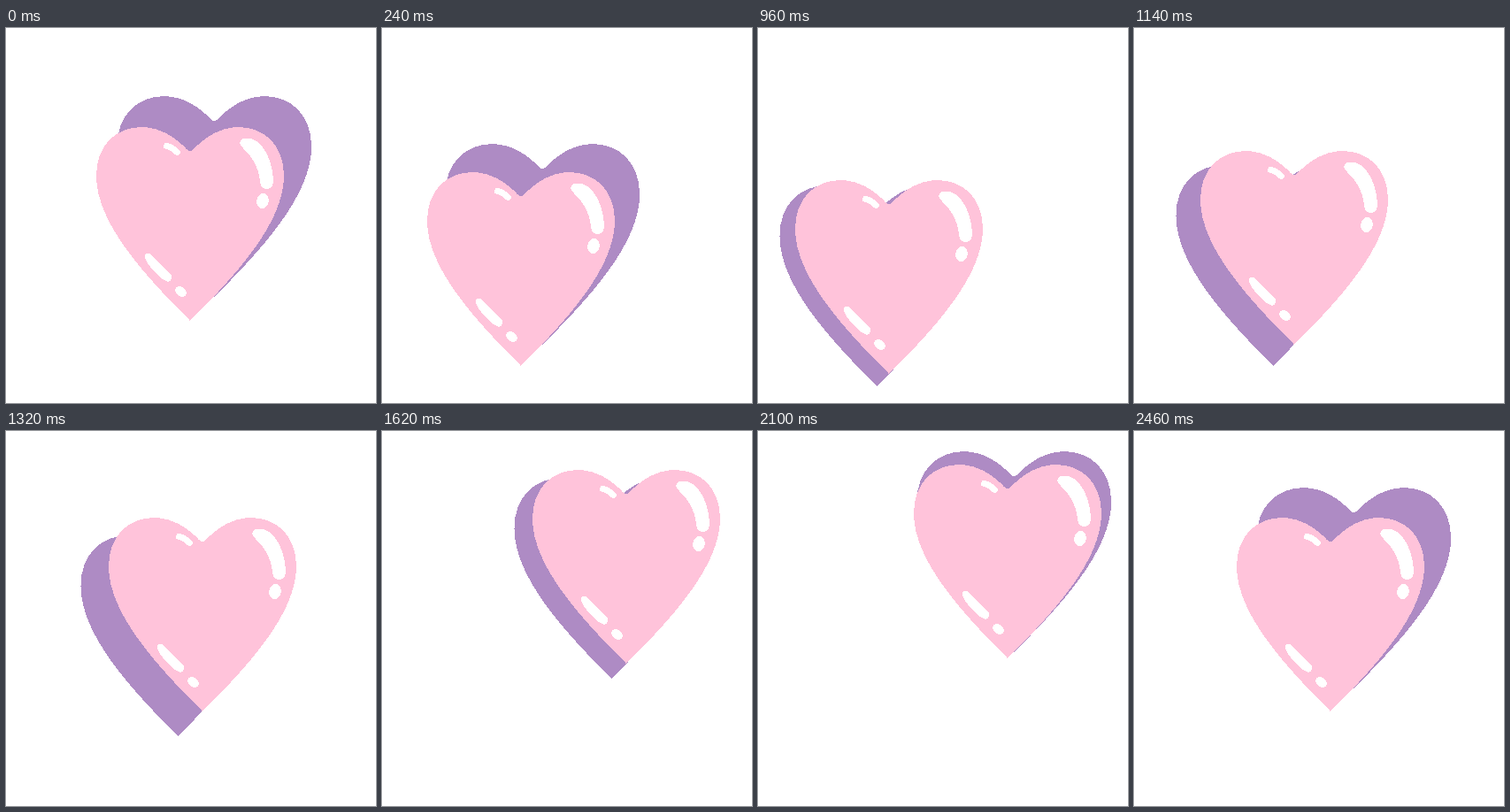
An HTML page for the animation above (2.52 s loop, 418 px wide and 424 px high).

```html
<!DOCTYPE html>
<html lang="en">
<head>
<meta charset="utf-8">
<title>Floating heart</title>
<style>
  html, body { margin: 0; width: 100%; height: 100%; overflow: hidden; background: #fff; }
  svg { display: block; width: 418px; height: 424px; }
</style>
</head>
<body>
<svg viewBox="0 0 418 424" shape-rendering="crispEdges">
  <defs>
    <!-- The tip of the heart sits at the origin. -->
    <path id="heart" d="M0 0 C-50 -50 -106 -110 -106 -164 C-106 -198 -84 -219 -55 -219
      C-33 -219 -15 -206 -4 -194 Q0 -190 4 -194 C15 -206 33 -219 55 -219
      C84 -219 106 -198 106 -164 C106 -110 50 -50 0 0Z"/>
  </defs>
  <g id="back"><use href="#heart" transform="translate(208.3 331) scale(1.036)" fill="#ae8bc4"/></g>
  <g id="front" fill="#fff">
    <use href="#heart" transform="translate(208 331)" fill="#ffc3da"/>
    <path d="M266 126 C272 123 281 125 287 131 C297 141 302 160 302 173 C302 180 298 182 294 182
      C289 182 287 178 287 172 C285 157 278 145 268 136 C263 132 264 128 266 126Z"/>
    <ellipse rx="6.8" ry="8.6" transform="translate(290 195.5) rotate(10)"/>
    <path d="M181.5 133.5 Q188 135 193.5 140.5" fill="none" stroke="#fff" stroke-width="7" stroke-linecap="round"/>
    <path d="M157 256 C160 253 164 255 167 259 C173 267 180 272 185 277 C189 281 187 286 183 287
      C177 286 167 276 160 266 C157 261 156 258 157 256Z"/>
    <ellipse rx="6.8" ry="5.2" transform="translate(197.5 298) rotate(40)"/>
  </g>
</svg>
<script>
  const LOOP = 2520, STEP = 60, LAG = 120;
  const front = document.getElementById('front');
  const back = document.getElementById('back');

  // Diagonal swing: a sine with a touch of third harmonic for softer turns.
  function swing(time) {
    const angle = time / LOOP * 2 * Math.PI;
    return -Math.round(85.2 * Math.sin(angle) + 3 * Math.sin(3 * angle));
  }

  function place(layer, offset) {
    layer.setAttribute('transform', `translate(${offset} ${-offset})`);
  }

  function draw(now) {
    const time = Math.floor(now % LOOP / STEP) * STEP;
    place(front, swing(time));
    place(back, swing(time - LAG));
  }

  const start = performance.now();
  function tick() {
    draw(performance.now() - start);
    requestAnimationFrame(tick);
  }
  tick();
</script>
</body>
</html>
```
